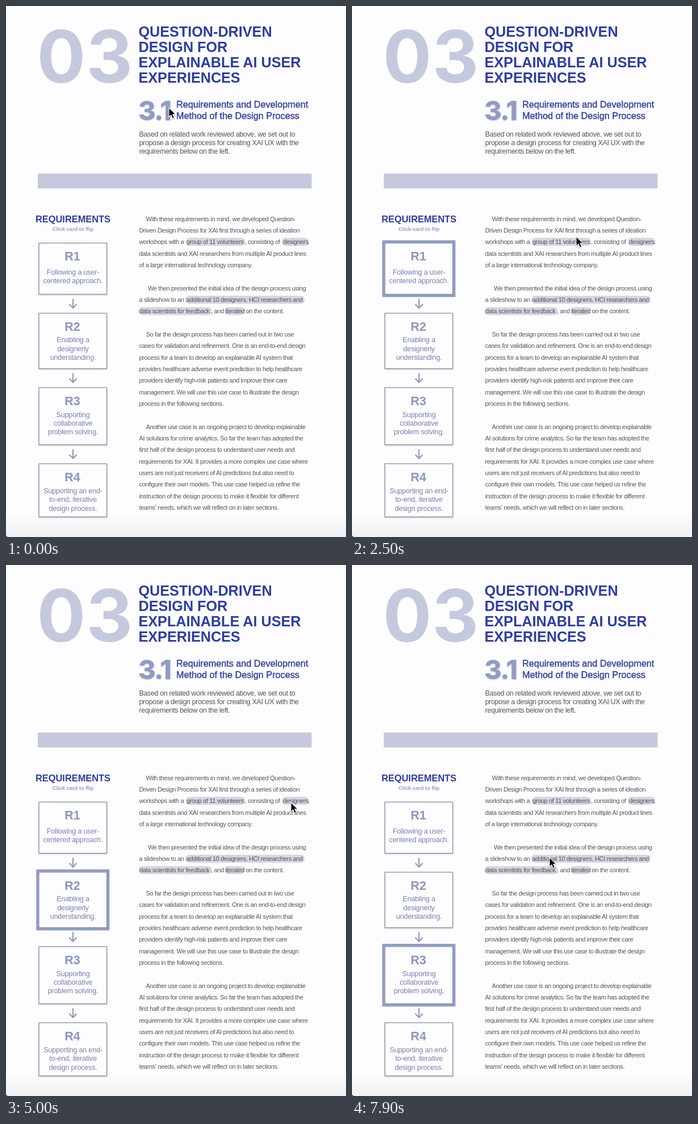
Write an HTML page that moves like this. It is 599 px wide and 935 px high and loops after 8 s.

```html
<!DOCTYPE html>
<html lang="en">
<head>
<meta charset="utf-8">
<title>Question-driven design</title>
<style>
html, body { margin: 0; width: 100%; height: 100%; overflow: hidden; background: #fdfcfe; }
svg { display: block; }
text { font-family: "Liberation Sans", Arial, sans-serif; white-space: pre; }
.title { font-size: 25.2px; font-weight: 700; fill: #2e3d9f; }
.big { font: 700 127px Inter, sans-serif; letter-spacing: 1px; fill: #c6c9dd; }
.num { font: 800 47px Inter, sans-serif; letter-spacing: -2px; fill: #929bc4; filter: drop-shadow(0 1.5px 1px #0003); }
.sub { font-size: 16.2px; fill: #3543a2; stroke: #3543a2; stroke-width: .45px; }
.intro { font-size: 12.5px; letter-spacing: -.36px; fill: #55555a; }
.req { font-size: 16.4px; font-weight: 700; fill: #2e3d9f; text-anchor: middle; }
.hint { font-size: 9.3px; font-weight: 700; fill: #949cc5; text-anchor: middle; }
.code { font-size: 21.5px; font-weight: 700; fill: #8c95c2; text-anchor: middle; }
.label { font-size: 12.6px; letter-spacing: -.2px; fill: #7880b4; text-anchor: middle; }
.body { font-size: 11px; letter-spacing: -.35px; fill: #56565b; }
.card { fill: #fdfcfe; stroke: #8c8c96; stroke-width: 1.2px; filter: drop-shadow(.5px 1px 1px #0004); }
.ring { fill: none; stroke: #919bc6; stroke-width: 4.5px; }
.arrow { fill: none; stroke: #8d96c1; stroke-width: 2.1px; }
</style>
</head>
<body>
<script>
const text = (cls, x, y, s) => `<text class="${cls}" x="${x}" y="${y}">${s}</text>`;
const lines = (cls, x, y, step, list) => list.map((s, i) => text(cls, x, y + i * step, s)).join("");
const rect = (x, y, w, h, attrs) => `<rect x="${x}" y="${y}" width="${w}" height="${h}" ${attrs}/>`;

// top, bottom, heading baseline, first label baseline, label lines
const cards = [
  [417.5, 507.5, 448, 473, ["Following a user-", "centered approach."]],
  [541, 638.5, 572, 592.3, ["Enabling a", "designerly", "understanding."]],
  [672, 772.5, 703, 723.5, ["Supporting", "collaborative", "problem solving."]],
  [806, 899.5, 837, 858, ["Supporting an end-", "to-end, iterative", "design process."]]
];

// x, centre y, width, group
const pills = [
  [317, 415, 104, 0], [486, 415, 47.5, 1], [316, 517, 210, 2],
  [233.5, 537, 129, 2], [385, 537, 35, 3]
];

// row, x, text
const left = 234.5;
const body = [
  [0, 246.5, "With these requirements in mind, we developed Question-"],
  [1, left, "Driven Design Process for XAI first through a series of ideation"],
  [2, left, "workshops with a"], [2, 318, "group of 11 volunteers"],
  [2, 420.5, ", consisting of"], [2, 488, "designers"], [2, 531.5, ","],
  [3, left, "data scientists and XAI researchers from multiple AI product lines"],
  [4, left, "of a large international technology company."],
  [6, 250, "We then presented the initial idea of the design process using"],
  [7, left, "a slideshow to an"],
  [7, 317.5, "additional 10 designers, HCI researchers and"],
  [8, 235, "data scientists for feedback"], [8, 361, ", and"],
  [8, 386.5, "iterated"], [8, 422.5, "on the content."],
  [10, 246.5, "So far the design process has been carried out in two use"],
  [11, left, "cases for validation and refinement. One is an end-to-end design"],
  [12, left, "process for a team to develop an explainable AI system that"],
  [13, left, "provides healthcare adverse event prediction to help healthcare"],
  [14, left, "providers identify high-risk patients and improve their care"],
  [15, left, "management. We will use this use case to illustrate the design"],
  [16, left, "process in the following sections."],
  [18, 246.5, "Another use case is an ongoing project to develop explainable"],
  [19, left, "AI solutions for crime analytics. So far the team has adopted the"],
  [20, left, "first half of the design process to understand user needs and"],
  [21, left, "requirements for XAI. It provides a more complex use case where"],
  [22, left, "users are not just receivers of AI predictions but also need to"],
  [23, left, "configure their own models. This use case helped us refine the"],
  [24, left, "instruction of the design process to make it flexible for different"],
  [25, left, "teams' needs, which we will reflect on in later sections."]
];

const drawCard = ([top, bottom, headY, labelY, label], i) =>
  rect(58, top, 119.5, bottom - top, 'class="card"') +
  rect(55.5, top - 2.7, 124.5, bottom - top + 5.4, 'class="ring" opacity="0"') +
  text("code", 117, headY, "R" + (i + 1)) +
  lines("label", 118, labelY, 15.3, label) +
  (i < 3 ? `<path class="arrow" d="M118 ${bottom + 8}v16m-6.5 -6.5l6.5 6.8l6.5 -6.8"/>` : "");

document.body.innerHTML = `<svg width="599" height="935" viewBox="0 0 599 935">
<defs><linearGradient id="fade" x2="0" y2="1">
<stop stop-color="#fdfcfe"/><stop offset="1" stop-color="#f0eff1"/></linearGradient></defs>
${rect(0, 0, 599, 935, 'fill="#fdfcfe"')}
${rect(0, 895, 599, 40, 'fill="url(#fade)"')}
<path d="M0 931.5Q.5 934.5 3.5 935H0z" fill="#333"/>
${text("big", 54.5, 135, "03")}
${lines("title", 233.5, 54, 27.1, ["QUESTION-DRIVEN", "DESIGN FOR", "EXPLAINABLE AI USER", "EXPERIENCES"])}
${text("num", 233, 201, "3.1")}
${lines("sub", 300, 179.3, 19.3, ["Requirements and Development", "Method of the Design Process"])}
${lines("intro", 234.5, 229.5, 15.2, ["Based on related work reviewed above, we set out to",
  "propose a design process for creating XAI UX with the", "requirements below on the left."])}
${rect(56, 295, 482.5, 26.3, 'fill="#c6c9dd"')}
${text("req", 118, 381, "REQUIREMENTS")}
${text("hint", 118, 396.3, "Click card to flip")}
${cards.map(drawCard).join("")}
${pills.map(([x, y, w]) => rect(x, y - 6.8, w, 14, 'class="pill" rx="6.5"')).join("")}
${body.map(([row, x, s]) => text("body", x, +(378.8 + row * 20.33).toFixed(2), s)).join("")}
<path id="cursor" d="M0 0V16.6L3.8 13L6.5 19.2L9.5 17.9L6.8 11.9H12z"
 stroke="#fff" stroke-width="1.1" style="filter:drop-shadow(0 1px 1px #0005)"/>
</svg>`;

const rings = document.querySelectorAll(".ring");
const pillRects = document.querySelectorAll(".pill");
const cursor = document.getElementById("cursor");

// time, x, y of the pointer tip
const path = [
  [0, 287, 179], [300, 287, 179], [1100, 392, 413], [1800, 392, 413], [2400, 395, 406],
  [2900, 395, 406], [3500, 494, 405], [3700, 494, 405], [4100, 502, 418], [5200, 502, 418],
  [5900, 281, 492], [6100, 281, 492], [6800, 348, 515], [8000, 348, 515]
];
// start and end of each highlight, per group
const press = [[1100, 1600], [3900, 4400], [7000, 7400]];
const glow = [[1600, 3450], [4400, 5300], [7400, 8400]];

const clamp = v => Math.max(0, Math.min(1, v));
const ease = v => v * v * (3 - 2 * v);
const level = (t, span, ramp) =>
  span ? clamp((t - span[0]) / ramp) * clamp(1 - (t - span[1]) / ramp) : 0;
const mix = (a, b, k) => a + (b - a) * k;

function draw(now) {
  const t = Math.floor(now % 8000 / 100) * 100;
  const i = path.findIndex(p => p[0] > t);
  const [t0, x0, y0] = path[i - 1], [t1, x1, y1] = path[i];
  const k = ease((t - t0) / (t1 - t0));
  cursor.setAttribute("transform", `translate(${mix(x0, x1, k)} ${mix(y0, y1, k)})`);
  rings.forEach((r, n) => r.setAttribute("opacity", level(t, glow[n], 300)));
  pillRects.forEach((p, n) => {
    const v = level(t, press[pills[n][3]], 200);
    p.setAttribute("fill", `rgb(${mix(212, 171, v)},${mix(214, 178, v)},${mix(226, 212, v)})`);
  });
  requestAnimationFrame(draw);
}
draw(0);
</script>
</body>
</html>
```
